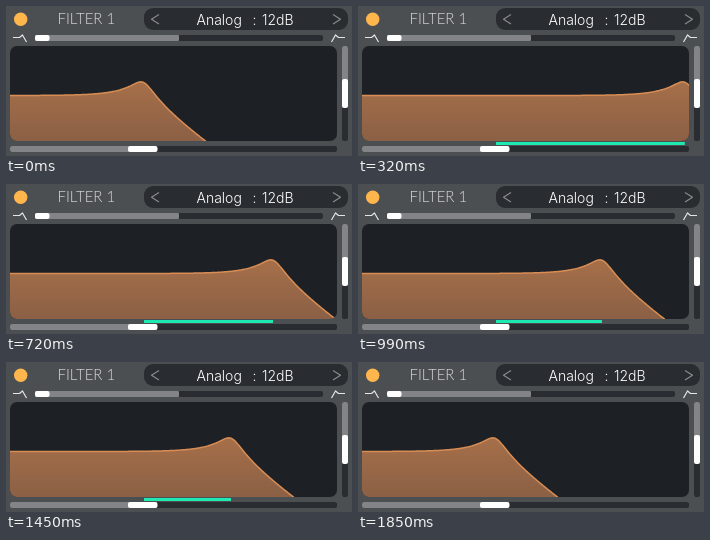
An HTML page that plays this animation: 346x150 px, repeating every 2.25 s.

```html
<!DOCTYPE html>
<html lang="en">
<head>
<meta charset="utf-8">
<title>Filter envelope</title>
<style>
  html, body { margin: 0; width: 100%; height: 100%; overflow: hidden; background: #4c4f52; }
  svg { display: block; width: 346px; height: 150px; }
  .title { font: 300 15px Lato, sans-serif; fill: #d9dadb; }
  .mode { font: 300 14px Inter, sans-serif; fill: #fff; }
  .dark { fill: #292c30; }
  .grey { fill: #828487; }
  .knob { fill: #fff; }
  .stroke { fill: none; stroke-linejoin: round; }
</style>
</head>
<body>
<svg viewBox="0 0 346 150">
  <defs>
    <clipPath id="panel"><rect x="4" y="40" width="327" height="95" rx="7"/></clipPath>
    <linearGradient id="fill" gradientUnits="userSpaceOnUse" x1="0" y1="76" x2="0" y2="135">
      <stop offset="0" stop-color="#a66f49"/>
      <stop offset="1" stop-color="#8b6045"/>
    </linearGradient>
  </defs>

  <circle cx="14.7" cy="13.2" r="6.7" fill="#ffb74d"/>
  <text class="title" x="51.5" y="18.3">FILTER 1</text>

  <rect class="dark" x="138" y="2" width="204" height="22" rx="9"/>
  <g class="mode">
    <text x="190.5" y="19">Analog</text>
    <text x="246.5" y="19">:</text>
    <text x="256" y="19">12dB</text>
  </g>
  <g class="stroke" stroke="#888a8d" stroke-width="1.2">
    <path d="M153 8.5L145.5 13.2L153 18"/>
    <path d="M327 8.5L334.5 13.2L327 18"/>
  </g>
  <g class="stroke" stroke="#e4e5e6" stroke-width="1.2">
    <path d="M7 31.5H13.5L16.5 29L20.5 36"/>
    <path d="M339 31.5H332.5L329.5 29L325.5 36"/>
  </g>

  <rect class="dark" x="29" y="29" width="288" height="6" rx="2"/>
  <rect class="grey" x="29" y="29" width="144" height="6" rx="1"/>
  <rect class="knob" x="29" y="29" width="14.5" height="6" rx="2"/>

  <rect class="dark" x="336" y="40" width="6" height="95" rx="2"/>
  <path class="grey" d="M336 88V42Q336 40 338 40H340Q342 40 342 42V88Z"/>
  <rect class="knob" x="336" y="73" width="6" height="29" rx="2"/>

  <rect class="dark" x="4" y="140" width="327" height="6" rx="2"/>
  <rect class="grey" x="4" y="140" width="130" height="6" rx="2"/>
  <rect class="knob" x="122" y="140" width="29.5" height="6" rx="2"/>

  <rect id="bar" x="138" y="136" width="0" height="3" fill="#1de9b0"/>

  <rect x="4" y="40" width="327" height="95" rx="7" fill="#1d2125"/>
  <g clip-path="url(#panel)">
    <path id="area" fill="url(#fill)"/>
    <path id="line" class="stroke" stroke="#d88d55" stroke-width="1.5"/>
  </g>
</svg>
<script>
  const LOOP = 2250;
  const REST = 137, SUSTAIN = 225;
  const ATTACK_END = 345, DECAY_END = 1450, RELEASE = 1780, RELEASE_END = 1850;
  const STEPS = [0, 60, 130, 190, 260, 320, 390, 450, 520, 590, 650, 720, 790, 850,
    920, 990, 1050, 1120, 1180, 1250, 1320, 1380, 1450, 1780, 1850];
  const BASE = 89.5, OCTAVE = 30, DB = 1.85, Q = 2.28;

  const [bar, area, line] = ['bar', 'area', 'line'].map(id => document.getElementById(id));

  // Cutoff position in pixels: linear attack, exponential decay, short release.
  function cutoff(t) {
    if (t < 60 || t >= RELEASE_END) return REST;
    if (t < ATTACK_END) return REST + 0.577 * (t + 9);
    if (t < DECAY_END) return 215 + 52 * Math.exp((720 - t) / 462);
    return t < RELEASE ? SUSTAIN : 148;
  }

  // Resonant two-pole low-pass response.
  function response(x, c) {
    const w2 = 4 ** ((x - c) / OCTAVE);
    return BASE + DB * 10 * Math.log10((1 - w2) ** 2 + w2 / Q ** 2);
  }

  function draw(t) {
    const c = cutoff(t);
    const points = [];
    for (let x = 2; x <= 334; x++) points.push(x + ' ' + response(x, c).toFixed(2));
    const d = 'M' + points.join('L');
    line.setAttribute('d', d);
    area.setAttribute('d', d + 'V400H2Z');
    bar.setAttribute('width', Math.max(0, Math.min(c, 331) - 138));
  }

  const start = performance.now();
  let shown = -1;
  function tick() {
    const t = (performance.now() - start) % LOOP;
    const step = STEPS.findLast(s => s <= t);
    if (step !== shown) draw(shown = step);
    requestAnimationFrame(tick);
  }
  tick();
</script>
</body>
</html>
```
